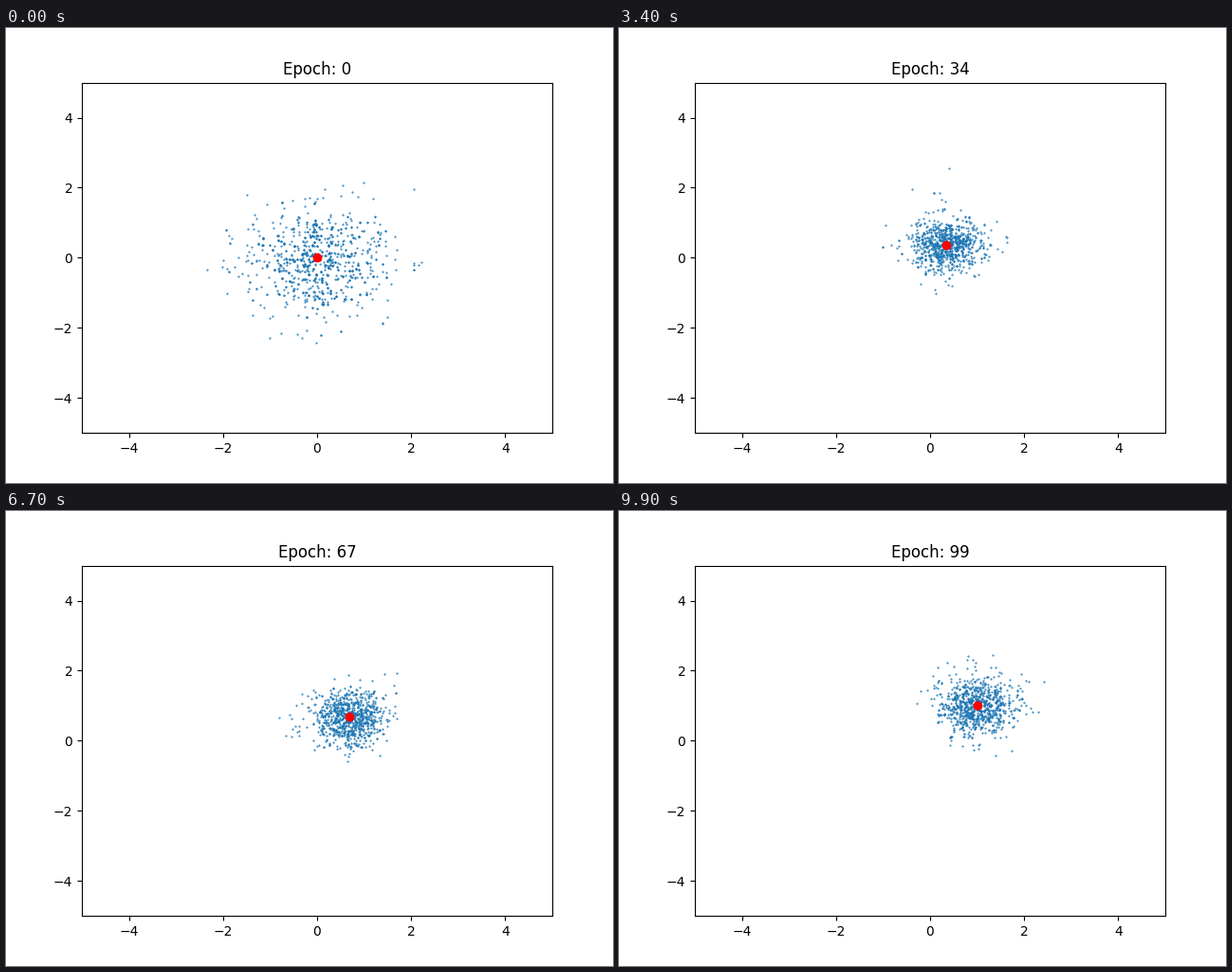
A matplotlib script that plays this animation: 640x480 px, repeating every 10 s.

```python
import numpy as np
import matplotlib.pyplot as plt
from matplotlib.animation import FuncAnimation

EPOCHS = 100
SIZE = 1000
SWAP_RATE = 0.3
MUTATION_SCALE = 0.32

rng = np.random.default_rng(7)


def target(epoch):
    return np.full(2, 0.01 * (epoch + 1))


def select(pop, goal):
    """Binary tournament: the closer of two random individuals survives."""
    dist = np.hypot(*(pop - goal).T)
    a, b = rng.integers(len(pop), size=(2, SIZE))
    return pop[np.where(dist[a] < dist[b], a, b)]


def crossover(parents):
    """Swap the y coordinate within some of the neighbouring pairs."""
    kids = parents.copy()
    swap = 2 * np.flatnonzero(rng.random(SIZE // 2) < SWAP_RATE)
    kids[swap, 1] = parents[swap + 1, 1]
    kids[swap + 1, 1] = parents[swap, 1]
    return kids


def mutate(pop):
    return pop + rng.laplace(0, MUTATION_SCALE, pop.shape)


def evolve():
    pop = rng.normal(0, 1.1, (SIZE // 2, 2))
    history = []
    for epoch in range(EPOCHS):
        if epoch:
            pop = mutate(pop)
        pop = crossover(select(pop, target(epoch)))
        history.append(pop)
    return history


history = evolve()

fig, ax = plt.subplots(figsize=(6.4, 4.8), dpi=100)
ax.set_xlim(-5, 5)
ax.set_ylim(-5, 5)
cloud, = ax.plot([], [], ".", color="C0", markersize=1)
goal, = ax.plot([], [], "ro")
title = ax.set_title("Epoch: 0")


def update(epoch):
    cloud.set_data(*history[epoch].T)
    goal.set_data(*target(epoch)[:, None])
    title.set_text(f"Epoch: {epoch}")
    return cloud, goal, title


anim = FuncAnimation(fig, update, frames=EPOCHS, interval=100,
                     init_func=lambda: update(0), repeat=True, repeat_delay=0)
plt.show()
```
